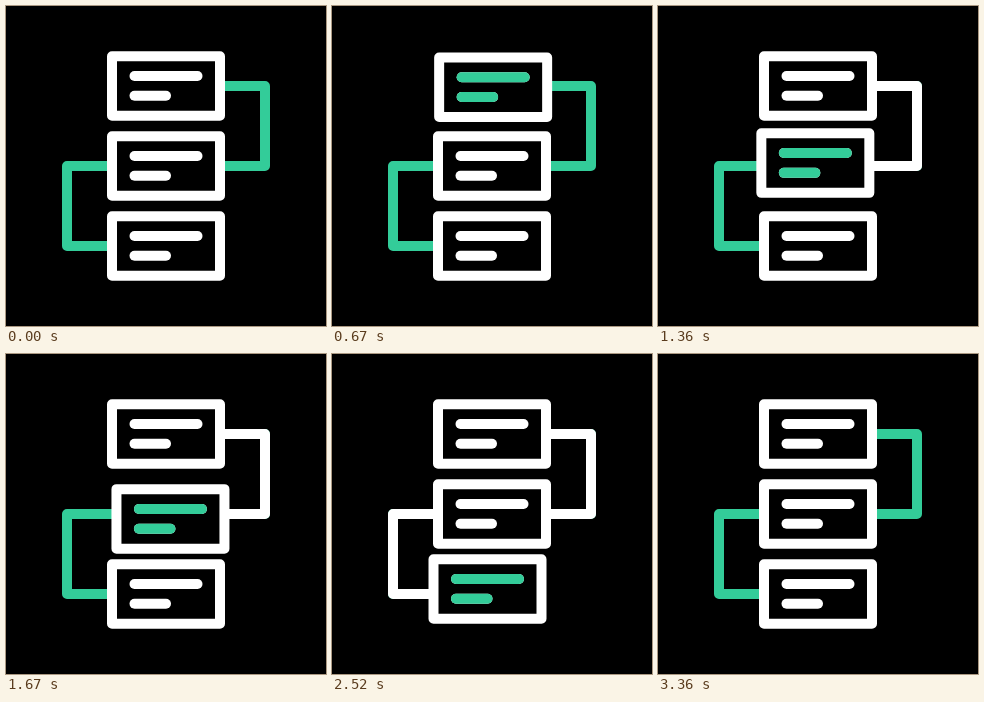
Animation of 320x320 px, one loop 3390 ms. Source, as an HTML page with a canvas:

```html
<!DOCTYPE html>
<html lang="en">
<head>
<meta charset="utf-8">
<title>Linked cards</title>
<style>
  html, body { margin: 0; width: 100%; height: 100%; overflow: hidden; background: #000; }
  canvas { display: block; width: 320px; height: 320px; }
</style>
</head>
<body>
<canvas id="stage"></canvas>
<script>
const LOOP = 3390, WHITE = '#fff', GREEN = '#33cc99';
const canvas = document.getElementById('stage');
const ctx = canvas.getContext('2d');
const dpr = window.devicePixelRatio || 1;
canvas.width = canvas.height = 320 * dpr;
ctx.scale(dpr, dpr);
ctx.lineWidth = 10;
ctx.lineJoin = 'round';

// on / off: [start, end] of the green sweep entering and leaving each text line
const cards = [
  { y: 80,  shake: 182,  on: [[15, 215], [205, 365]],      off: [[905, 1175], [1040, 1250]] },
  { y: 160, shake: 1266, on: [[913, 1113], [1100, 1260]],  off: [[1995, 2265], [2130, 2340]] },
  { y: 240, shake: 2350, on: [[2003, 2203], [2190, 2350]], off: [[2830, 3052], [3000, 3200]] }
];

// on / off: white sweep along each connector
const links = [
  { pts: [[214, 80], [259, 80], [259, 160], [214, 160]],  on: [915, 1185],  off: [2835, 3105] },
  { pts: [[106, 160], [61, 160], [61, 240], [106, 240]], on: [2005, 2275], off: [3090, 3352] }
];

const sparks = [
  [[243, 236], [273, 206]],
  [[247, 247.5], [302, 247.5]],
  [[243, 257], [268, 294]]
];
const sparkOn = [2690, 3190], sparkOff = [2780, 3342];

const shakeKeys = [[0, 0], [170, -1], [395, 1], [620, -1], [790, 0]];

const ease = p => (1 - Math.cos(Math.PI * Math.min(1, Math.max(0, p)))) / 2;
const sweep = (t, [a, b]) => ease((t - a) / (b - a));

function shakeAt(t) {
  for (let i = 1; i < shakeKeys.length; i++) {
    const [t0, v0] = shakeKeys[i - 1], [t1, v1] = shakeKeys[i];
    if (t >= t0 && t < t1) return v0 + (v1 - v0) * ease((t - t0) / (t1 - t0));
  }
  return 0;
}

// Strokes the part of a polyline between fractions a and b
function stroke(pts, color, a = 0, b = 1, cap = 'round') {
  if (b - a < 0.001) return;
  const lens = pts.slice(1).map((p, i) => Math.hypot(p[0] - pts[i][0], p[1] - pts[i][1]));
  const total = lens.reduce((s, l) => s + l, 0);
  const from = a * total, to = b * total;
  let pos = 0, open = false;
  ctx.beginPath();
  lens.forEach((len, i) => {
    const s = Math.max(from, pos), e = Math.min(to, pos + len);
    if (e > s) {
      const at = d => pts[i].map((v, k) => v + (pts[i + 1][k] - v) * (d - pos) / len);
      if (!open) ctx.moveTo(...at(s));
      ctx.lineTo(...at(e));
      open = true;
    }
    pos += len;
  });
  ctx.lineCap = cap;
  ctx.strokeStyle = color;
  ctx.stroke();
}

function drawCard({ y, shake, on, off }, t) {
  const s = shakeAt(t - shake);
  ctx.save();
  ctx.translate(4.5 * s, y + 5 * s);
  ctx.beginPath();
  ctx.rect(106, -29.8, 108, 59.6);
  ctx.fillStyle = '#000';
  ctx.fill();
  ctx.strokeStyle = WHITE;
  ctx.stroke();
  [[-10, 191.5], [9.8, 160]].forEach(([ly, end], i) => {
    const line = [[128.5, ly], [end, ly]];
    stroke(line, WHITE);
    stroke(line, GREEN, sweep(t, off[i]), sweep(t, on[i]));
  });
  ctx.restore();
}

function draw(t) {
  ctx.fillStyle = '#000';
  ctx.fillRect(0, 0, 320, 320);
  for (const { pts, on, off } of links) {
    stroke(pts, GREEN, 0, 1, 'butt');
    stroke(pts, WHITE, sweep(t, off), sweep(t, on));
  }
  for (const card of cards) drawCard(card, t);
  for (const line of sparks) stroke(line, GREEN, sweep(t, sparkOff), sweep(t, sparkOn));
}

const start = performance.now();
function tick() {
  draw((performance.now() - start) % LOOP);
  requestAnimationFrame(tick);
}
tick();
</script>
</body>
</html>
```
